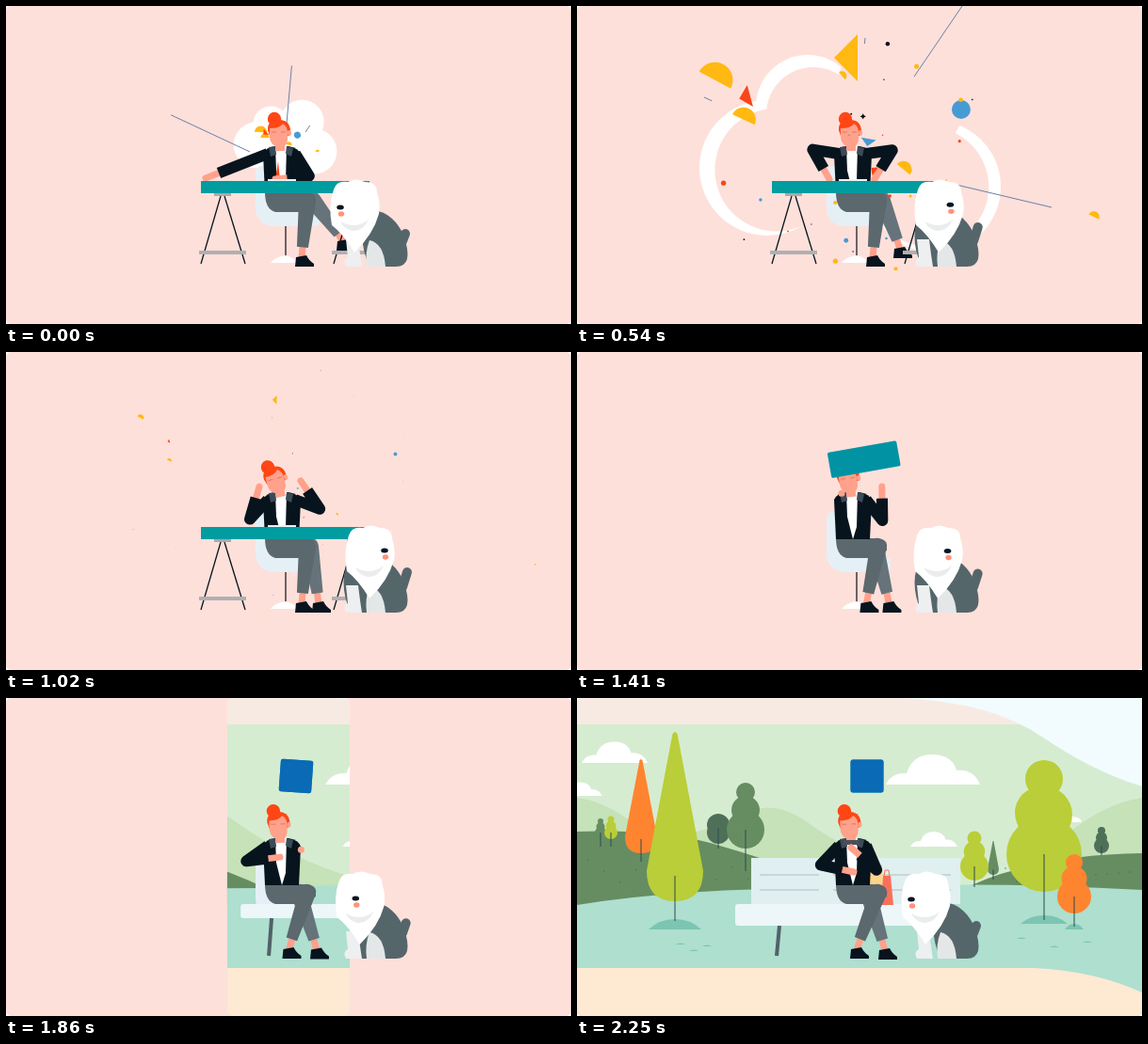
An HTML page with a canvas for the animation above (2.28 s loop, 600 by 338 pixels).

```html
<!DOCTYPE html>
<html lang="en">
<head>
<meta charset="utf-8">
<style>
html, body { margin: 0; width: 100%; height: 100%; overflow: hidden; background: #fff; }
canvas { display: block; }
</style>
</head>
<body>
<canvas id="stage" width="600" height="338"></canvas>
<script>
const ctx = document.getElementById('stage').getContext('2d');
const LOOP = 2280, PINK = '#fee0da', DARK = '#07141e', SKIN = '#ffa18b', HAIR = '#ff4614',
  YELLOW = '#ffb912', RED = '#fb4519', BLUE = '#479bd3', LIME = '#b9ce38', GREEN = '#668d62',
  MOSS = '#4f7058', TRUNK = '#2e4b4c', ORANGE = '#ff8430', TEAL = '#009c9f', LOGO = '#0b6ab5',
  TROUSERS = '#5b686d', FUR = '#55666b';

const clamp = x => Math.max(0, Math.min(1, x));
const span = (t, a, b) => clamp((t - a) / (b - a));
const smooth = x => x * x * (3 - 2 * x);
const cubic = x => x < .5 ? 4 * x ** 3 : 1 - 4 * (1 - x) ** 3;
const easeOut = (x, power) => 1 - (1 - x) ** power;
const lerp = (a, b, k) => a + (b - a) * k;

// Each key is [time, ...values]; the first and last poses hold.
function at(t, keys) {
  let i = 0;
  while (i < keys.length - 2 && t >= keys[i + 1][0]) i++;
  const [a, b] = [keys[i], keys[i + 1]], k = smooth(span(t, a[0], b[0]));
  return a.slice(1).map((v, n) => lerp(v, b[n + 1], k));
}

function fill(d, color) { ctx.fillStyle = color; ctx.fill(new Path2D(d)); }
function rect(x, y, w, h, color) { ctx.fillStyle = color; ctx.fillRect(x, y, w, h); }
function rounded(x, y, w, h, r, color) {
  ctx.fillStyle = color;
  ctx.beginPath();
  ctx.roundRect(x, y, w, h, r);
  ctx.fill();
}
function oval(x, y, rx, ry, color) {
  ctx.fillStyle = color;
  ctx.beginPath();
  ctx.ellipse(x, y, rx, ry, 0, 0, 7);
  ctx.fill();
}
const disc = (x, y, r, color) => oval(x, y, r, r, color);
function line(points, color, width = 1, cap = 'butt') {
  ctx.beginPath();
  for (let i = 0; i < points.length; i += 2) ctx.lineTo(points[i], points[i + 1]);
  Object.assign(ctx, { strokeStyle: color, lineWidth: width, lineCap: cap, lineJoin: 'round' });
  ctx.stroke();
}
function placed(x, y, angle, scale, draw) {
  ctx.save();
  ctx.translate(x, y);
  ctx.rotate(angle * Math.PI / 180);
  ctx.scale(scale, scale);
  draw();
  ctx.restore();
}
function sparkle(x, y, r) {
  placed(x, y, 0, r, () => fill('M0-1Q.2-.2 1 0Q.2.2 0 1Q-.2.2-1 0Q-.2-.2 0-1Z', DARK));
}

// Thought cloud: white puffs [x, y, r, hole start], later eaten by holes of the same layout.
const puffs = [[202, 172, 72, 235], [245, 107, 55, 235], [342, 100, 68, 0], [380, 192, 70, 235], [310, 165, 60, 0]];
function cloud(t) {
  if (t > 840) return;
  const k = lerp(.34, 1, easeOut(span(t, 0, 540), 2));
  const around = (x, y, s) => puffs.map(p => [lerp(x, p[0], s), lerp(y, p[1], s), p[2] * s]);
  for (const puff of around(300, 135, k)) disc(...puff, '#fff');
  puffs.forEach(([, , , start], i) => {
    const hole = 1.03 * easeOut(span(t, start, start + 600), 3);
    if (!hole) return;
    const [x, y, r] = around(300, 135, k)[i];
    disc(lerp(310, x, hole), lerp(195, y, hole), r * hole, PINK);
  });
}

const HALF = 'M-1 .4A1 1 0 0 1 1 .4Z', TRI = 'M-1 0L1-2V2Z', DOT = 'M-1 0a1 1 0 1 0 2 0a1 1 0 1 0-2 0';
// shape, colour, then the place, size and angle near the end of the burst
const pieces = [
  [HALF, YELLOW, 150, 72, 19, 28], [HALF, YELLOW, 179, 116, 13, 25], [HALF, YELLOW, 283, 73, 5, 50],
  [HALF, YELLOW, 349, 171, 9, 40], [HALF, YELLOW, 550, 222, 6, 25], [TRI, RED, 178, 97, 6, -15],
  [TRI, YELLOW, 285.5, 55, 12.5, 0], [TRI, RED, 315, 174, 3, 40], [TRI, BLUE, 309, 145, 4, -80],
  [DOT, BLUE, 408, 110, 10, 0]
];
const rays = [
  [259, 155, 135, 97, 0], [298, 125, 306, 34, 0], [318, 134, 409, 0, 170], [310, 168, 504, 214, 170]
];
function confetti(t) {
  if (t > 1120) return;
  for (const [x1, y1, x2, y2, delay] of rays) {
    const tail = span(t, delay, delay + 560) ** 2, head = easeOut(span(t, delay - 180, delay + 240), 2);
    if (tail < head) line([tail, head].flatMap(k => [lerp(x1, x2, k), lerp(y1, y2, k)]), '#6b80a8');
  }
  const burst = easeOut(span(t, -40, 1040), 4) / .955;
  const size = lerp(.35, 1, span(t, 0, 240)) * (1 - span(t, 600, 1120));
  for (const [shape, color, x, y, r, angle] of pieces)
    placed(lerp(292, x, burst), lerp(142, y, burst), angle + 30 * (burst - 1), r * size, () => fill(shape, color));
}
function specks(t) {
  if (t > 1080) return;
  let seed = 19;
  const random = () => (seed = seed * 16807 % 2147483647) / 2147483647;
  const grow = Math.sin(Math.PI * span(t, 60, 1080)), out = easeOut(span(t, 0, 1080), 3);
  for (let i = 0; i < 30; i++) {
    const angle = random() * 6.28, reach = 40 + 130 * random(), r = (.7 + 2 * random() ** 2) * grow;
    const x = 300 + Math.cos(angle) * reach * out, y = 185 + Math.sin(angle) * reach * out;
    if (i % 8 == 3) sparkle(x, y, r * 1.4);
    else disc(x, y, r, [YELLOW, BLUE, YELLOW, RED, DARK][i % 5]);
  }
}

// left hand, right hand
const hands = [
  [240, 212, 183, 286, 184], [540, 268, 184, 316, 184], [1020, 269, 143, 313, 137],
  [1710, 289, 155, 331, 147], [2010, 293, 183, 296, 175], [2250, 294, 185, 291, 159]
];
// left ankle x, right ankle x and y, right knee x
const feet = [
  [240, 314, 358, 248, 326], [540, 314, 343, 256, 324], [1020, 314, 332, 265, 323],
  [1710, 303, 331, 265, 313], [2010, 298, 329, 266, 309], [2250, 297, 327, 266, 309]
];

function shin(x, y, kneeX, color) {
  const length = Math.hypot(x - kneeX, y - 207);
  line([lerp(kneeX, x, .75), lerp(207, y, .75), x, y + 3], SKIN, 7);
  placed(kneeX, 207, Math.atan2(y - 207, x - kneeX) * 180 / Math.PI, 1, () =>
    fill(`M0-9L${length * .85}-6V6L0 9Q-9 9-9 0Q-9-9 0-9Z`, color));
  placed(x, y, 0, 1, () => fill('M-6 2L5 0Q8 6 13 9V12H-7Z', DARK));
}
// Two-bone arm; the elbow bends outwards, or down when the hand is level with the shoulder.
function arm(x, hx, hy, side) {
  const y = 157, upper = 28, lower = 36, d = Math.hypot(hx - x, hy - y);
  const ux = (hx - x) / d, uy = (hy - y) / d;
  const along = Math.min(upper, (upper ** 2 - lower ** 2 + d * d) / (2 * d));
  const bend = Math.sqrt(upper ** 2 - along ** 2) * Math.sign(-uy * side + ux * .3);
  const ex = x + ux * along - uy * bend, ey = y + uy * along + ux * bend;
  const wx = lerp(ex, hx, .65), wy = lerp(ey, hy, .65);
  line([wx, wy, hx, hy], SKIN, 7, 'round');
  line([x, y, ex, ey, wx, wy], DARK, 12);
}
function woman(t) {
  const [leftFoot, rightFoot, lift, knee] = at(t, feet), [lx, ly, rx, ry] = at(t, hands);
  const [tilt] = at(t, [[540, 0], [1020, -14], [1710, -2]]);
  shin(rightFoot, lift, knee, '#66737a');
  shin(leftFoot, 265, 320, TROUSERS);
  fill('M275 198H313Q330 198 329 211L312 219H286Q275 216 275 198Z', TROUSERS);
  fill('M273 157Q276 150 286 149H300Q311 151 313 158L311 199H275Z', DARK);
  fill('M286 149H298L297 186L293 199L287 175Z', '#fff');
  fill('M279 150L286 149L287 158L281 160ZM298 149L305 151L303 160L297 157Z', '#3c4b57');
  if (t < 420) fill('M289 165L291 185H286Z', RED);
  placed(291, 150, tilt, 1, () => {
    rect(-5, -10, 10, 14, SKIN);
    disc(-6, -30, 7.2, HAIR);
    fill('M-13-18Q-14-29 0-29Q12-28 11-14L9-12L-11-12Z', HAIR);
    fill('M-11-20Q0-20 3-25Q9-22 8-11Q9-1 0 0Q-11-1-11-12Z', SKIN);
    oval(10, -15, 2, 3, SKIN);
    line([-9, -16, -4, -16], '#c9705e', .7);
    line([1, -16, 6, -16], '#c9705e', .7);
  });
  arm(278, lx, ly, -1);
  if (t > 2100) rect(283, 151, 17, 5, '#4a4f5c');
  arm(307, rx, ry, 1);
}

function chair(t) {
  if (t > 2070) return;
  fill('M265 178Q265 170 272 170H304V219H333V229Q333 234 327 234H282Q265 231 265 213Z', '#e5f0f6');
  if (t > 1860) return;
  line([297, 234, 297, 267], '#43363b', 1.5);
  fill('M281 273Q285 267 297 265Q308 268 309 273Z', '#fff');
}

function trestle(x, k) {
  ctx.save();
  ctx.translate(x, 198);
  ctx.scale(1, k);
  rect(-9, 0, 18, 4, '#a9aaae');
  line([-2, 4, -23, 76], DARK, 1.3);
  line([2, 4, 24, 76], DARK, 1.3);
  rect(-25, 62, 50, 4, '#afb0b2');
  ctx.restore();
}
// The desk top folds up into the square that floats overhead.
function deskToSquare(t) {
  const legs = 1 - smooth(span(t, 1110, 1260)), k = cubic(span(t, 1200, 1560));
  if (legs) for (const x of [230, 371]) trestle(x, legs);
  if (t < 1110) rect(278, 184, 30, 3, '#eaf2f5');
  const [angle, size] = at(t, [[1560, -14, 33], [1710, -2, 33], [2010, 10, 36], [2250, 0, 35]]);
  const w = lerp(179, size, k), h = lerp(13, size, k), tint = span(t, 1350, 1700);
  placed(lerp(296.5, 308, k), lerp(192.5, 83, k), angle * k, 1, () => {
    rounded(-w / 2, -h / 2, w, h, 2.5 * k, TEAL);
    ctx.globalAlpha = tint;
    rounded(-w / 2, -h / 2, w, h, 2.5 * k, LOGO);
  });
  if (t > 1600 && t < 1800) disc(273, 97, 1.4, DARK);
  const glint = Math.sin(Math.PI * span(t, 1880, 2140));
  for (const [x, y, r] of [[311, 52, 2], [342, 58, 2.5], [334, 85, 4.5]]) sparkle(x, y, r * glint);
}

function dog(t) {
  const [turn] = at(t, [[240, 0], [540, .88], [1020, 1], [1710, .7], [2010, 0]]);
  const left = lerp(378, 358, clamp(turn * 1.4)), nose = lerp(355, 402, turn), noseY = 214 - 3 * turn;
  line([412, 252, 421, 250, 424 + 2 * turn, 242 - 8 * turn], FUR, 10, 'round');
  fill(`M${left + 8} 277Q${left - 7} 243 ${left + 8} 218H395Q412 222 422 243Q434 277 414 277Z`, FUR);
  fill('M361 277Q357 270 363 267L361 248H374Q376 265 378 277Z', '#edeff0');
  fill('M383 277Q381 262 386 249Q401 252 403 277Z', '#e4e7e8');
  placed(371 + 16 * turn, 212, 0, 1, () => {
    fill('M-23-17Q-20-27-8-25Q0-30 10-25Q23-25 23-14Q27-2 25 9Q19 31-1 50Q-13 30-25 21Q-29 0-23-17Z', '#fff');
    fill('M-16 17Q0 26 14 15Q8 28-3 27Q-12 25-16 17Z', '#eaecee');
  });
  oval(nose + 1, noseY + 7, 3.2, 2.7, '#ff9279');
  oval(nose, noseY, 3.8, 2.5, DARK);
}

function bench(t) {
  if (t < 1750) return;
  const [left, foot, bottom] = at(t, [[1750, 282, 292, 234], [2010, 198, 264, 234], [2200, 168, 214, 242]]);
  const top = lerp(219, 170, smooth(span(t, 2030, 2180)));
  rect(185, top, 222, 219 - top, '#e0eff0');
  for (const y of [188, 204]) if (top < y - 4) {
    line([194, y, 257, y], '#aebec4');
    line([272, y, 397, y], '#aebec4');
  }
  line([foot + 1, bottom, foot - 2, 274], '#526168', 4);
  rounded(left, 219, 400 - left, bottom - 219, 3, '#edf6f8');
}
function bags(t) {
  placed(324, 220, 0, smooth(span(t, 1840, 1990)), () => {
    fill('M-14-40L0-43L2 0H-12Z', '#ffd48a');
    fill('M1-31H9L12 0H-1Z', '#f9705a');
    line([2, -30, 3, -37, 7, -37, 8, -30], '#f9705a');
  });
}

function skyCloud(x, y, s) {
  placed(x, y, 0, s, () => fill('M-50 0Q-44-13-28-12Q-22-32 0-32Q21-31 25-15Q43-17 50 0Z', '#fff'));
}
function trunk(x, top, ground) { line([x, top, x, ground], TRUNK); }
function tree(color, x, y, r, ground) {
  disc(x, y - 2 * r, r * .5, color);
  disc(x, y - 1.05 * r, r * .75, color);
  disc(x, y, r, color);
  trunk(x, y, ground);
}
function cone(color, x, top, w, bottom, ground) {
  const h = bottom - top, r = w * .09;
  fill(`M${x - r} ${top + r}Q${x} ${top - r} ${x + r} ${top + r}L${x + w} ${bottom - h * .18}
    Q${x + w} ${bottom} ${x} ${bottom}Q${x - w} ${bottom} ${x - w} ${bottom - h * .18}Z`, color);
  trunk(x, bottom - h * .15, ground);
}
function mound(x, y, w, h) {
  fill(`M${x - w} ${y}Q${x - w * .6} ${y - h} ${x} ${y - h}Q${x + w * .6} ${y - h} ${x + w} ${y}Z`, '#7cc5b2');
}
function park(t) {
  const drift = (2250 - t) / 34;
  rect(0, 0, 600, 338, '#f7eae2');
  rect(0, 28, 600, 260, '#d6ecd1');
  fill('M343 0Q440 4 495 42Q548 78 600 94V0Z', '#f2fbfe');
  fill('M600 106Q560 112 520 145L460 200H600Z', '#c5e2b8');
  skyCloud(378 + drift, 92, 1);
  skyCloud(40 + drift / 2, 69, .7);
  skyCloud(4 + drift / 2, 104, .45);
  skyCloud(379 + drift / 3, 158, .5);
  skyCloud(518 + drift / 3, 132, .36);
  fill('M0 106Q35 110 75 145Q130 150 172 123Q210 106 246 133Q290 166 380 195L400 220H0Z', '#c5e2b8');
  fill('M0 142Q95 139 155 158Q225 178 280 204L230 222H0Z', GREEN);
  fill('M600 165Q525 166 468 182Q435 190 405 206L600 215Z', GREEN);
  fill('M0 220Q110 202 270 202Q430 194 600 204V338H0Z', '#aedfcf');
  fill('M0 287H485Q550 290 600 313V338H0Z', '#fee9d2');
  for (let i = 0; i < 12; i++) {
    disc(12 + i * 17, 172 + i * 37 % 25, .7, '#42694e');
    disc(455 + i * 12, 181 + i * 29 % 15, .7, '#42694e');
  }
  tree(GREEN, 25, 143, 6, 158);
  tree(LIME, 36, 143, 7, 158);
  disc(150, 135, 12, MOSS);
  disc(150, 143, 12, MOSS);
  trunk(150, 138, 160);
  tree(GREEN, 179, 140, 20, 184);
  cone(ORANGE, 68, 65, 17, 165, 174);
  mound(104, 246, 28, 11);
  cone(LIME, 104, 36, 30, 216, 237);
  tree(MOSS, 557, 157, 8, 167);
  cone(GREEN, 442, 152, 6, 188, 193);
  tree(LIME, 422, 179, 15, 201);
  mound(496, 240, 25, 9);
  tree(LIME, 496, 166, 40, 236);
  disc(493, 122, 28, LIME);
  mound(528, 246, 10, 6);
  tree(ORANGE, 528, 211, 18, 243);
  for (let i = 0; i < 3; i++) {
    mound(110 + i * 14, 262 + i * 19 % 12, 5, 1.6);
    mound(472 + i * 35, 256 + i * 9 % 14, 5, 1.6);
  }
}

function draw(t) {
  ctx.clearRect(0, 0, 600, 338);
  rounded(0, 0, 600, 338, 5, PINK);
  cloud(t);
  confetti(t);
  const half = 300 * cubic(span(t, 1685, 2150));
  if (half > 0) {
    ctx.save();
    ctx.beginPath();
    ctx.roundRect(300 - half, 0, half * 2, 338, 5);
    ctx.clip();
    park(t);
    ctx.restore();
  }
  for (const part of [chair, bench, bags, woman, specks, deskToSquare, dog]) part(t);
}

function tick() {
  draw(performance.now() % LOOP);
  requestAnimationFrame(tick);
}
tick();
</script>
</body>
</html>
```
